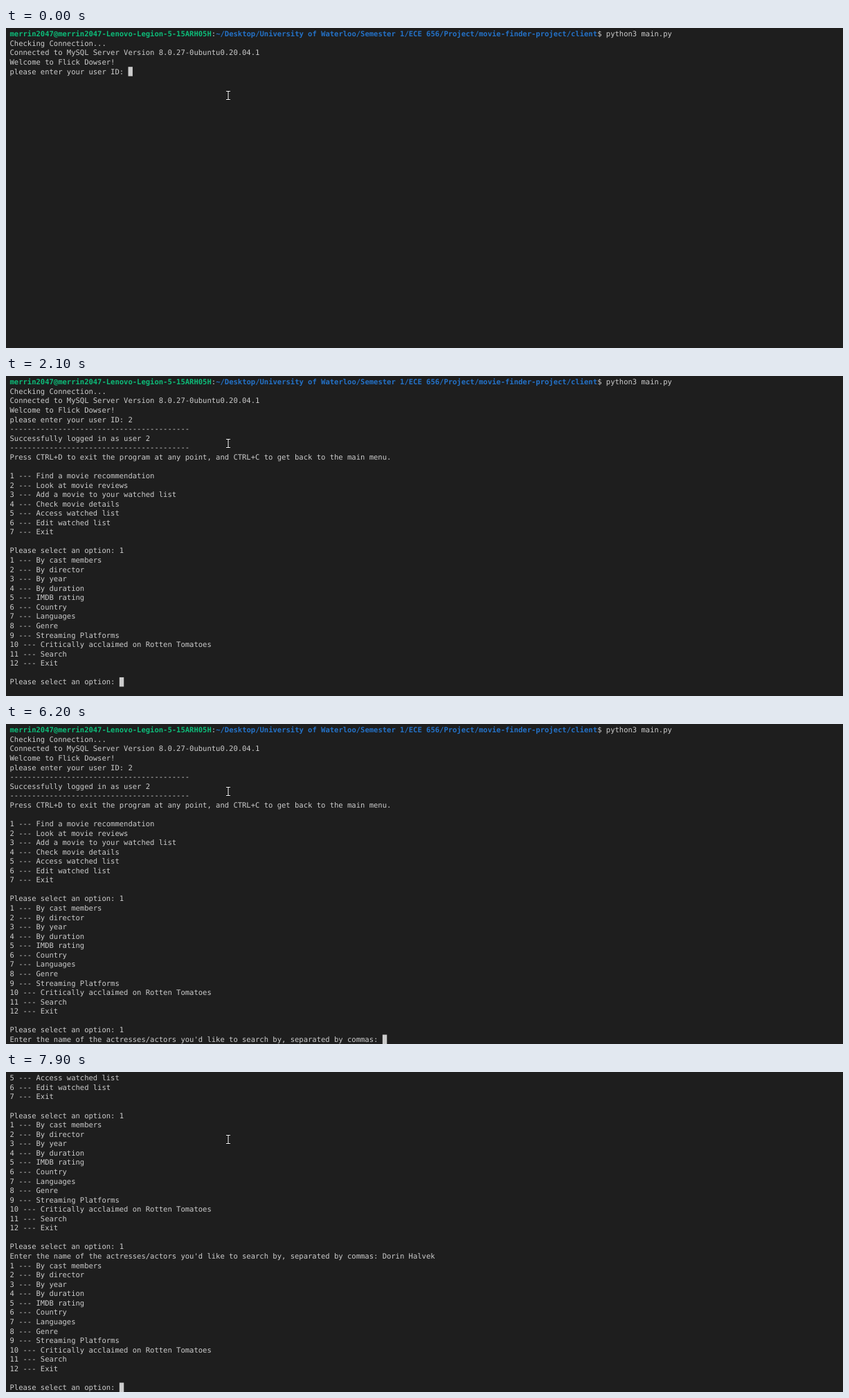
These frames come from a looping animation (1209 by 463 pixels, 8 s). An HTML page:

```html
<!DOCTYPE html>
<html lang="en">
<head>
<meta charset="utf-8">
<title>Terminal session</title>
<style>
  html, body { margin: 0; width: 100%; height: 100%; overflow: hidden; background: #1e1e1e; }
  svg { display: block; width: 1209px; height: 463px; }
  text {
    font: 10.52px "DejaVu Sans Mono", monospace;
    fill: #ccc;
    white-space: pre;
    text-rendering: geometricPrecision;
  }
  .host { fill: #0dbc79; font-weight: bold; }
  .path { fill: #2472c8; font-weight: bold; }
  #caret { fill: #ccc; }
</style>
</head>
<body>
<svg viewBox="0 0 1209 463">
  <rect width="1209" height="463" fill="#1e1e1e"/>
  <g id="screen"></g>
  <rect id="caret" width="6.4" height="13.5"/>
  <g fill="none">
    <path d="M318 91.5H324M321 91.5V103.5M318 103.5H324" stroke="#000" stroke-width="2.6"/>
    <path d="M318 91.5H324M321 91.5V103.5M318 103.5H324" stroke="#fff" stroke-width="1.1"/>
  </g>
</svg>
<script>
const LOOP = 8000, ROWS = 34;
const LEFT = 5.5, TOP = 1.95, CELL = 6.3335, ROW = 13.5625, BASELINE = 10.4;
const SVG = "http://www.w3.org/2000/svg";

const host = "merrin2047@merrin2047-Lenovo-Legion-5-15ARH05H";
const path = "~/Desktop/University of Waterloo/Semester 1/ECE 656/Project/movie-finder-project/client";
const rule = "-".repeat(41);
const actor = "Dorin Halvek";

const menu = items =>
  items.map((item, i) => `${i + 1} --- ${item}\n`).join("") + "\nPlease select an option: ";

const filters = menu([
  "By cast members", "By director", "By year", "By duration", "IMDB rating", "Country",
  "Languages", "Genre", "Streaming Platforms", "Critically acclaimed on Rotten Tomatoes",
  "Search", "Exit"
]);

// Everything printed up to each input prompt.
const login = `${host}:${path}$ python3 main.py
Checking Connection...
Connected to MySQL Server Version 8.0.27-0ubuntu0.20.04.1
Welcome to Flick Dowser!
please enter your user ID: `;

const home = `${login}2
${rule}
Successfully logged in as user 2
${rule}
Press CTRL+D to exit the program at any point, and CTRL+C to get back to the main menu.

` + menu([
  "Find a movie recommendation", "Look at movie reviews", "Add a movie to your watched list",
  "Check movie details", "Access watched list", "Edit watched list", "Exit"
]);

const search = `${home}1\n${filters}`;
const cast = `${search}1
Enter the name of the actresses/actors you'd like to search by, separated by commas: `;

const typing = [[6500, 1], [6600, 2], [6800, 4], [7000, 6], [7200, 7], [7400, 9], [7500, 10], [7700, 12]];

const steps = [
  [0, login], [500, login + "2"],
  [600, home], [2000, home + "1"],
  [2100, search], [4000, search + "1"], [4700, search],
  [6200, cast],
  ...typing.map(([time, count]) => [time, cast + actor.slice(0, count)]),
  [7900, `${cast}${actor}\n${filters}`]
];

const screen = document.getElementById("screen");
const caret = document.getElementById("caret");

function addText(string, row, col = 0, style = "") {
  const el = document.createElementNS(SVG, "text");
  el.setAttribute("x", LEFT + col * CELL);
  el.setAttribute("y", TOP + row * ROW + BASELINE);
  if (style) el.setAttribute("class", style);
  el.textContent = string;
  screen.append(el);
}

function addLine(line, row) {
  if (!line.startsWith(host)) return addText(line, row);
  const pathCol = host.length + 1, endCol = pathCol + path.length;
  addText(host, row, 0, "host");
  addText(":", row, host.length);
  addText(path, row, pathCol, "path");
  addText(line.slice(endCol), row, endCol);
}

function draw(output) {
  const lines = output.split("\n").slice(-ROWS);
  const last = lines.length - 1;
  screen.replaceChildren();
  lines.forEach(addLine);
  caret.setAttribute("x", LEFT + lines[last].length * CELL);
  caret.setAttribute("y", TOP + last * ROW);
}

let shown;
function tick() {
  const time = performance.now() % LOOP;
  const step = steps.findLast(([start]) => start <= time);
  if (step !== shown) draw((shown = step)[1]);
  requestAnimationFrame(tick);
}
tick();
</script>
</body>
</html>
```
